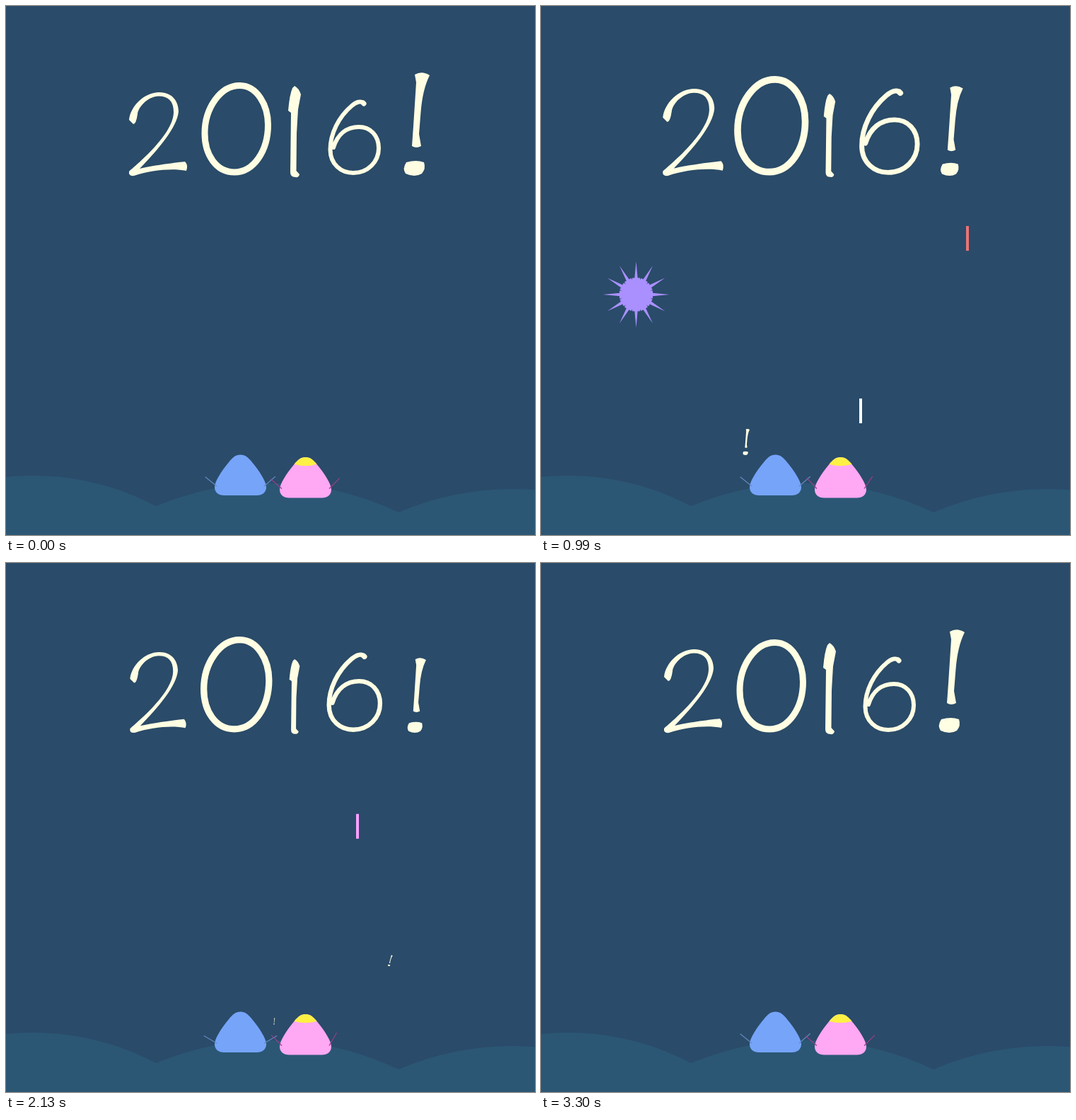
Write an HTML page with a canvas that moves like this. It is 748 by 748 pixels and loops after 3.33 s.

```html
<!DOCTYPE html>
<html lang="en">
<head>
<meta charset="utf-8">
<title>2016!</title>
<style>
  html, body { margin: 0; width: 100%; height: 100%; overflow: hidden; background: #2a4b69; }
  canvas { display: block; }
</style>
</head>
<body>
<canvas id="stage" width="748" height="748" role="img" aria-label="2016!"></canvas>
<script>
const ctx = document.getElementById('stage').getContext('2d');
const LOOP = 3330, STEP = 30, CREAM = '#fffee3', BASELINE = 240;

// Shared pose times; every wobbling part eases from one value to the next.
const TIMES = [0, 510, 990, 1650, 2130, 2610, 3300];
function wobble(values, t) {
  let i = 0;
  while (i < TIMES.length - 1 && t >= TIMES[i + 1]) i++;
  if (i === TIMES.length - 1) return values[0];
  const p = (t - TIMES[i]) / (TIMES[i + 1] - TIMES[i]);
  const from = values[i], to = values[(i + 1) % values.length];
  return from + (to - from) * p * p * (3 - 2 * p);
}

// Pen strokes are [width, path]; width 0 means a filled shape.
const glyph = (x, scales, ...strokes) =>
  ({ x, scales, strokes: strokes.map(([w, d]) => [w, new Path2D(d)]) });

const bang = glyph(580.5, [1, .808, .87, .788, .726, .897],
  [0, 'M578 97Q588 91 599 98Q589 118 586.500 150L584 181L587 198Q580 202 574 198L576 170L580 108Z'],
  [0, 'M566 221Q580 217 591 221Q594 230 588 237Q578 243 565 237Q560 230 566 221Z']);
const glyphs = [
  glyph(215, [1, 1.186, 1.042, 1.12, .966, 1.153],
    [0, 'M174 161C176 142 195 122 217 122C236 122 244 136 244 149C242 172 215 203 189 230C205 226 235 222 253 220Q258 225 255 233C235 229 205 232 181 240Q173 241 174 234C190 220 237 180 237 150C237 135 230 127.500 216 127.500C200 128 187 143 186 153Q184 167 180 167Z']),
  glyph(325.5, [1, .91, 1.068, .818, 1.03, 1.038],
    [9, 'M331 112.500C355 113 370.500 140 370.500 168C370.500 205 350 235 323 235C297 235 281 210 281 180C281 145 303 112 331 112.500Z']),
  glyph(408, [1, .787, .913, 1.016, .819, 1.04],
    [0, 'M408 113Q414 116 417 125L413 146L411 180L410.500 233L415 238Q414 243 409 242Q402 242 402 235L403 151L399 148Q401 125 405 116Z']),
  glyph(492, [1, 1.22, 1.147, 1.257, 1.055, 1.064],
    [6, 'M506 138C502 133 495 136 489 141C470 157 458.500 181 458.500 203C458.500 224 474 236 491 236C512 236 527 220 527 201C527 183 515 171 499 171C482 171 469 181 463 200'],
    [7, 'M505 137L506 138']),
  bang
];

function drawGlyph(g) {
  for (const [width, path] of g.strokes) {
    ctx.lineWidth = width;
    width ? ctx.stroke(path) : ctx.fill(path);
  }
}

function drawTitle(t) {
  ctx.fillStyle = ctx.strokeStyle = CREAM;
  ctx.lineCap = ctx.lineJoin = 'round';
  for (const g of glyphs) {
    const s = wobble(g.scales, t);
    ctx.save();
    ctx.translate(g.x, BASELINE);
    ctx.scale(s, s);
    ctx.translate(-g.x, -BASELINE);
    drawGlyph(g);
    ctx.restore();
  }
}

// Small exclamation marks drifting up from the crowd.
const shouts = [
  { x: 285, y: 664, vx: .015, vy: -.14, start: 650, life: 830, size: 39 },
  { x: 460, y: 660, vx: .115, vy: -.135, start: 1406, life: 830, size: 41 },
  { x: 378.5, y: 658, vx: .0104, vy: -.148, start: 2062, life: 1000, size: 43 }
];
function drawShout(s, t) {
  const age = t - s.start, p = age / s.life;
  if (p <= 0 || p >= 1) return;
  const k = s.size * Math.sin(Math.PI * p) / 147;
  ctx.save();
  ctx.translate(s.x + s.vx * age, s.y + s.vy * age);
  ctx.rotate(2 * s.vx * p);
  ctx.scale(k, k);
  ctx.translate(-bang.x, -167);
  drawGlyph(bang);
  ctx.restore();
}

// Fireworks: a short rocket, then rays that lengthen and thin out.
const RISE = 251, RISE_SPEED = .345;
const firework = (x, y, color, start, rays, radius = rays === 24 ? 90 : 75, rocket = true) =>
  ({ x, y, color, start, rays, radius, rocket, life: rays * 13.3 + 280.4 });
const fireworks = [
  firework(374, 374, '#37ffc3', 90, 24, 90, false),
  firework(264, 128, '#34e9ff', 300, 24),
  firework(134.5, 408, '#aa90ff', 766, 12, 31),
  firework(452, 485, '#ffffff', 1193, 24),
  firework(603, 229, '#ec7475', 1228, 12),
  firework(152.5, 402, '#63dfff', 1481, 12),
  firework(497, 281, '#faa0ff', 2344, 24),
  firework(166, 387, '#ec7475', 2860, 12)
];
function drawFirework(f, t) {
  const age = t - f.start;
  ctx.fillStyle = f.color;
  if (age < 0) {
    if (!f.rocket || age < -RISE) return;
    const tip = -age * RISE_SPEED;
    ctx.fillRect(f.x - 2, f.y + tip, 4, Math.min(35, 15 + 2 * (age + RISE), tip));
    return;
  }
  const left = 1 - age / f.life;
  if (left <= 0) return;
  const r = f.radius * (1 - left * left), w = 32 * left ** 1.5;
  const turn = 2 * Math.PI / f.rays;
  ctx.save();
  ctx.translate(f.x, f.y);
  if (f.rays === 24) ctx.rotate(turn / 2);
  for (let i = 0; i < f.rays; i++) {
    ctx.fillRect(0, -w / 2, r, w);
    ctx.beginPath();
    ctx.moveTo(r - .5, -w / 5);
    ctx.lineTo(2 * r, 0);
    ctx.lineTo(r - .5, w / 5);
    ctx.fill();
    ctx.rotate(turn);
  }
  ctx.restore();
}

function drawHills() {
  ctx.fillStyle = '#2b5775';
  ctx.beginPath();
  for (const [x, y, r] of [[38, 1037, 373], [373.5, 1094.8, 420], [715, 1087, 404]]) {
    ctx.moveTo(x + r, y);
    ctx.arc(x, y, r, 0, 2 * Math.PI);
  }
  ctx.fill();
}

const body = new Path2D('M0 0C7 0 11 4 16 10C27 23 36.500 38 36.500 46C36.500 53 31 57.500 23 57.500H-23C-31 57.500 -36.500 53 -36.500 46C-36.500 38 -27 23 -16 10C-11 4 -7 0 0 0Z');
const cap = new Path2D('M0 0C7 0 11 4 16 10Q0 14.500 -16 10C-11 4 -7 0 0 0Z');
const people = [
  { x: 331.5, y: 634.5, color: '#76a4f9', arm: '#6488c0', shoulder: 44.5,
    left: [39, 24, 39, 41, 30, 33], right: [41, 28, 41, 49, 30, 27] },
  { x: 423.5, y: 638, color: '#ffa8f4', arm: '#983f8c', shoulder: 44.5, cap: '#fff044',
    left: [41, 51, 47, 26, 45, 47], right: [45, 57, 56, 41, 60, 43] }
];
function drawPerson(p, t) {
  ctx.save();
  ctx.translate(p.x, p.y);
  ctx.fillStyle = p.color;
  ctx.fill(body);
  if (p.cap) {
    ctx.fillStyle = p.cap;
    ctx.fill(cap);
  }
  ctx.strokeStyle = p.arm;
  ctx.lineWidth = 1.2;
  ctx.lineCap = 'butt';
  for (const [side, angles] of [[-1, p.left], [1, p.right]]) {
    const a = wobble(angles, t) * Math.PI / 180;
    ctx.beginPath();
    ctx.moveTo(side * 33.5, p.shoulder);
    ctx.lineTo(side * (33.5 + 21 * Math.cos(a)), p.shoulder - 21 * Math.sin(a));
    ctx.stroke();
  }
  ctx.restore();
}

function render() {
  const t = Math.floor(performance.now() % LOOP / STEP) * STEP;
  ctx.fillStyle = '#2a4b69';
  ctx.fillRect(0, 0, 748, 748);
  drawHills();
  fireworks.forEach(f => drawFirework(f, t));
  people.forEach(p => drawPerson(p, t));
  drawTitle(t);
  shouts.forEach(s => drawShout(s, t));
  requestAnimationFrame(render);
}
render();
</script>
</body>
</html>
```
